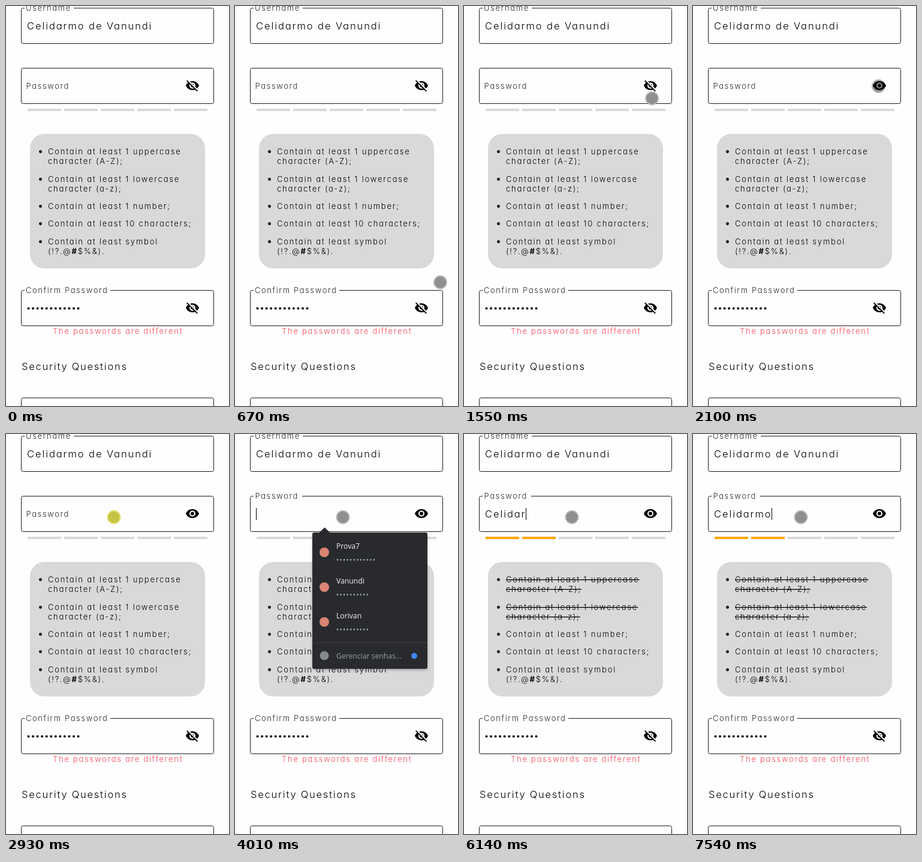
Recreate the animation shown at these times as an HTML page. Size 372 by 666 pixels, loop 8 s.

```html
<!DOCTYPE html>
<html lang="en">
<head>
<meta charset="utf-8">
<title>Password form</title>
<style>
  html, body { margin: 0; width: 100%; height: 100%; overflow: hidden; background: #fefefe; }
  svg { display: block; width: 372px; height: 666px; }
  text { font-family: Inter, Lato, sans-serif; font-weight: 300; font-feature-settings: "cv11"; fill: #000; }
  .input { font-size: 16.5px; letter-spacing: 1.9px; }
  .heading { font-size: 16.5px; letter-spacing: 1.76px; }
  .label { font-size: 13px; letter-spacing: 1.6px; fill: #2a2a2a; }
  .error { font-size: 13px; letter-spacing: 1.73px; fill: #f8485a; }
  .rules text { font-size: 13px; letter-spacing: 1.8px; }
  .rules .met { text-decoration: line-through; }
  .rules .bold { font-weight: 700; }
  .frame { fill: none; stroke: #1c1c1c; }
  .gap { fill: #fefefe; }
  .dots { fill: none; stroke-linecap: round; }
  .popup text { font-family: "Open Sans", "Noto Sans", sans-serif; font-weight: 400; font-size: 12.2px; fill: #f1f3f4; }
  .popup .muted { fill: #9aa0a6; }
  .popup { filter: drop-shadow(0 2px 2px rgba(0, 0, 0, .25)); }
</style>
</head>
<body>
<svg viewBox="0 0 372 666">
  <defs>
    <path id="eye" fill-rule="evenodd" d="M12 4.5C7 4.5 2.73 7.61 1 12c1.73 4.39 6 7.5 11 7.5s9.27-3.11 11-7.5c-1.73-4.39-6-7.5-11-7.5zM12 17a5 5 0 1 1 0-10 5 5 0 0 1 0 10zm0-8a3 3 0 1 0 0 6 3 3 0 0 0 0-6z"/>
    <path id="eyeOff" d="M12 7c2.76 0 5 2.24 5 5 0 .65-.13 1.26-.36 1.83l2.92 2.92c1.51-1.26 2.7-2.89 3.43-4.75-1.73-4.39-6-7.5-11-7.5-1.4 0-2.74.25-3.98.7l2.16 2.16C10.74 7.13 11.35 7 12 7zM2 4.27l2.74 2.74C3.08 8.3 1.78 10.02 1 12c1.73 4.39 6 7.5 11 7.5 1.55 0 3.03-.3 4.38-.84L19.73 22 21 20.73 3.27 3 2 4.27zM7.53 9.8l1.55 1.55c-.05.21-.08.43-.08.65 0 1.66 1.34 3 3 3 .22 0 .44-.03.65-.08l1.55 1.55c-.67.33-1.41.53-2.2.53-2.76 0-5-2.24-5-5 0-.79.2-1.53.53-2.2zm4.31-.78l3.15 3.15.02-.16c0-1.66-1.34-3-3-3l-.17.01z"/>
  </defs>

  <g class="frame">
    <rect x="25.5" y="3.5" width="321" height="59" rx="3"/>
    <rect x="25.5" y="103.5" width="321" height="59" rx="3"/>
    <rect x="25.5" y="473.5" width="321" height="59" rx="3"/>
    <rect x="25.5" y="652.5" width="321" height="59" rx="3"/>
  </g>

  <rect class="gap" x="31" y="2" width="82" height="3"/>
  <text class="label" x="33" y="8">Username</text>
  <text class="input" x="35" y="39">Celidarmo de Vanundi</text>

  <rect class="gap" id="passGap" x="31" y="102" width="81" height="3"/>
  <text class="label" id="passLabel" x="33.5" y="138">Password</text>
  <text class="input" id="typed" x="35" y="139"></text>
  <rect id="caret" y="123" width="1" height="20"/>
  <g id="bars"></g>

  <rect x="40" y="213" width="292" height="224" rx="24" fill="#d9d9d9"/>
  <g class="rules" id="rules"></g>

  <rect class="gap" x="31" y="472" width="143" height="3"/>
  <text class="label" x="33" y="478">Confirm Password</text>
  <path class="dots" d="M37.5 503.5h83.5" stroke="#000" stroke-width="4" stroke-dasharray="0 7.55"/>
  <text class="error" x="78" y="546">The passwords are different</text>
  <text class="heading" x="26" y="606">Security Questions</text>

  <circle id="cursor" r="10.4" stroke-width="2"/>
  <use id="passEye" x="299" y="120.5"/>
  <use href="#eyeOff" x="299" y="490.5"/>

  <g class="popup" id="popup">
    <path d="M140 165l9.5-9.5 9.5 9.5z" fill="#292a2d"/>
    <rect x="129" y="164" width="192" height="227" rx="3" fill="#292a2d"/>
    <g id="logins"></g>
    <path d="M129 347.5h192" stroke="#404246"/>
    <circle cx="149" cy="369" r="7.5" fill="#85888c"/>
    <text class="muted" x="169" y="374">Gerenciar senhas...</text>
    <circle cx="299" cy="369.5" r="5" fill="#4285f4"/>
  </g>
</svg>
<script>
  const LOOP = 8000;
  const $ = id => document.getElementById(id);

  function add(parent, tag, attrs, content = '') {
    const node = document.createElementNS('http://www.w3.org/2000/svg', tag);
    for (const key in attrs) node.setAttribute(key, attrs[key]);
    node.textContent = content;
    return parent.appendChild(node);
  }
  const show = (node, on) => node.setAttribute('visibility', on ? 'visible' : 'hidden');

  const bars = [0, 1, 2, 3, 4].map(i =>
    add($('bars'), 'rect', { x: 36 + 61 * i, y: 171, width: 56, height: 4 }));

  const rules = [
    [247, 'Contain at least 1 uppercase', 'character (A-Z);'],
    [293, 'Contain at least 1 lowercase', 'character (a-z);'],
    [338, 'Contain at least 1 number;'],
    [367, 'Contain at least 10 characters;'],
    [397, 'Contain at least symbol', '(!?.@#$%&).']
  ].map(([y, ...lines]) => {
    const rule = add($('rules'), 'g', {});
    add(rule, 'circle', { cx: 57.5, cy: y - 4.5, r: 2.4 });
    return lines.map((line, i) => {
      const text = add(rule, 'text', { x: 70, y: y + 16 * i });
      line.split(/(#)/).forEach(part =>
        add(text, 'tspan', part === '#' ? { class: 'bold' } : {}, part));
      return text;
    });
  });

  [['Prova7', 12], ['Vanundi', 10], ['Lorivan', 10]].forEach(([name, count], i) => {
    const y = 191 + 58 * i;
    add($('logins'), 'circle', { cx: 149, cy: y + 6, r: 8, fill: '#d98474' });
    add($('logins'), 'text', { x: 169, y }, name);
    add($('logins'), 'path', {
      class: 'dots', d: `M171 ${y + 18.5}h${5.55 * (count - 1) + 0.2}`,
      stroke: '#9aa0a6', 'stroke-width': 2.8, 'stroke-dasharray': '0 5.55'
    });
  });

  const NAME = 'Celidarmo';
  // Time at which each count of letters is on screen.
  const KEYS = [[4210, 1], [4670, 2], [5000, 3], [5330, 4], [5730, 5],
                [5930, 6], [6140, 7], [7410, 8], [7540, 9]];

  const RISE = [644.5, 607, 567, 515, 460, 405, 352, 305, 265, 232, 205.5, 197.5];
  const SLIDE = [298, 262, 225, 198, 184, 180];

  // Index of the held step for a move that redraws `count` times from start to end.
  const stepAt = (t, start, end, count) =>
    Math.min(count - 1, Math.floor((t - start) / (end - start) * (count - 1) + 1e-6));
  const within = (t, from, to) => t >= from && t < to;

  function cursorAt(t) {
    if (t < 390) return [342.5, 644.5];
    if (t < 1210) {
      const y = RISE[stepAt(t, 390, 1140, RISE.length)];
      return [342.5 - 20 * ((644.5 - y) / 447) ** 9, y];
    }
    if (t < 2370) {
      const u = (stepAt(t, 1210, 1690, 8) + 1) / 8;
      const e = u * u * (3 - 2 * u);
      return [322.5 - 13 * e, 197.5 - 64 * e];
    }
    const x = SLIDE[stepAt(t, 2370, 2730, SLIDE.length)];
    return [x, 133.5 + 5 * (309.5 - x) / 129.5];
  }

  function render(t) {
    const letters = KEYS.reduce((n, [at, count]) => t >= at ? count : n, 0);
    const focused = t >= 3000;
    const floated = focused || within(t, 1960, 2030);

    show($('passGap'), floated);
    $('passLabel').setAttribute('y', floated ? 108 : 138);
    $('typed').textContent = NAME.slice(0, letters);
    const width = letters ? $('typed').getComputedTextLength() : 0;
    $('caret').setAttribute('x', Math.floor(35 + width));
    show($('caret'), focused && !within(t, 3480, 4010) && !within(t, 6610, 7140));

    const met = Math.min(letters, 2);
    bars.forEach((bar, i) =>
      bar.setAttribute('fill', i >= met ? '#d9d9d9' : met === 1 ? '#f00' : '#ffa500'));
    rules.forEach((lines, i) =>
      lines.forEach(line => line.setAttribute('class', i < met ? 'met' : '')));

    const [x, y] = cursorAt(t);
    const pressed = within(t, 1890, 2030) || within(t, 2930, 3000);
    const cursor = $('cursor');
    show(cursor, t >= 390);
    cursor.setAttribute('cx', x);
    cursor.setAttribute('cy', y);
    cursor.setAttribute('fill', pressed ? '#c5c446' : '#8f8f8f');
    cursor.setAttribute('stroke', pressed ? '#dfdf62' : '#b4b4b4');

    $('passEye').setAttribute('href', t >= 2030 ? '#eye' : '#eyeOff');
    show($('popup'), within(t, 3000, 4210));
  }

  function tick() {
    render(performance.now() % LOOP);
    requestAnimationFrame(tick);
  }
  tick();
</script>
</body>
</html>
```
